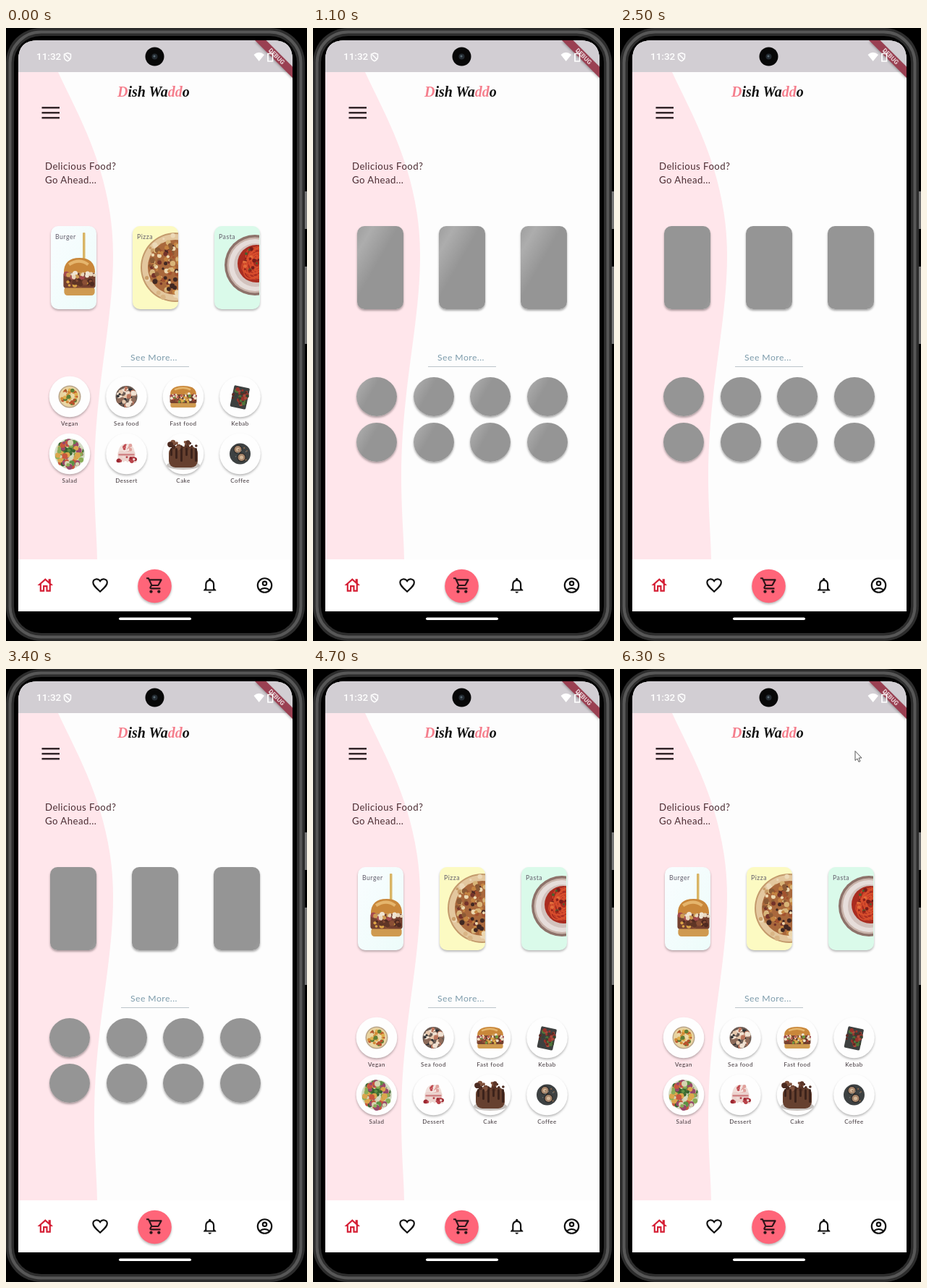
An HTML page for the animation above (6.4 s loop, 416 by 848 pixels).

```html
<!DOCTYPE html>
<html lang="en">
<head>
<meta charset="utf-8">
<title>Food ordering app</title>
<style>
  html, body { margin: 0; width: 100%; height: 100%; overflow: hidden; background: #000; }
  #stage { position: relative; width: 416px; height: 848px; overflow: hidden; }
  svg { position: absolute; inset: 0; }
  text { font-family: Lato, sans-serif; fill: #3c3237; }
  .heading { font-size: 13.2px; letter-spacing: .45px; fill: #4a2c32; }
  .more { font-size: 12.2px; letter-spacing: .45px; fill: #7c9bab; }
  .cardLabel { font-size: 8.7px; letter-spacing: .5px; fill: #625d6b; }
  .itemLabel { font-size: 8px; letter-spacing: .5px; text-anchor: middle; }
  .brand { font: italic bold 20px "Liberation Serif", serif; fill: #111; }
  .brand tspan { fill: #f57f8d; }
  .status { font: 500 13.5px Roboto, sans-serif; fill: #fff; }
  .debug { font: bold 8.6px Roboto, sans-serif; fill: #ecd9dd; text-anchor: middle; }
  .icon { fill: #111; fill-rule: evenodd; }
  .line { fill: none; stroke: #111; stroke-width: 2; }
  .shade { filter: drop-shadow(0 2px 1.6px #0004); }

  .loaded, .photos, .cursor { animation: 6400ms step-end infinite; }
  .loaded { animation-name: loaded; }
  .photos { animation-name: photos; }
  .cursor { animation-name: cursor; }
  .bone {
    position: absolute;
    box-shadow: 0 2px 3px #0005;
    background: linear-gradient(120deg, #959595 36%, #adadad 50%, #959595 64%) 0 0 / 300% 100%;
    animation: bones 6400ms step-end infinite, shimmer 6400ms linear infinite;
  }
  @keyframes loaded { 0%, 62.5% { visibility: visible } 15.625% { visibility: hidden } }
  @keyframes photos { 0%, 64.0625% { visibility: visible } 15.625% { visibility: hidden } }
  @keyframes bones { 0%, 62.5% { visibility: hidden } 15.625% { visibility: visible } }
  @keyframes cursor { 0% { visibility: hidden } 95.3125% { visibility: visible } }
  @keyframes shimmer {
    0%, 15.625% { background-position: 100% 0 }
    27.34%, 40.62% { background-position: -20% 0 }
    40.625% { background-position: 100% 0 }
    52.34%, 100% { background-position: -20% 0 }
  }
</style>
</head>
<body>
<div id="stage">
<svg width="416" height="848" viewBox="0 0 416 848">
  <defs>
    <linearGradient id="mint" x2="1" y2="1">
      <stop stop-color="#f9fdff"/><stop offset="1" stop-color="#edfcfa"/>
    </linearGradient>
    <clipPath id="screen"><path d="M17 807V44Q17 17 44 17H369Q396 17 396 44V807Z"/></clipPath>
    <clipPath id="cardArea"><path d="M62 274h64v115h-64zM175 274h63v115h-63zM288 274h62v115h-62z"/></clipPath>
  </defs>

  <path d="M411 226h5v52h-5zM411 330h5v107h-5z" fill="#777"/>
  <rect x="0" y="0" width="413" height="848" rx="48" fill="#2d2d2d"/>
  <rect x="5.500" y="5.500" width="402" height="837" rx="43" fill="none" stroke="#575757" stroke-width="4"/>
  <rect x="11" y="11" width="391" height="826" rx="37" fill="#000"/>

  <g clip-path="url(#screen)">
    <path d="M17 17H396V807H17Z" fill="#fdfdfd"/>
    <path d="M17 61H72C100 122 148 200 148 315C148 410 122 500 122 620C122 670 126 710 126 735H17Z" fill="#ffe6eb"/>
    <path d="M17 17H396V61H17Z" fill="#d2ced3"/>
    <path d="M344 17H359.500L396 53.500V69Z" fill="#9a4052" class="shade"/>
    <text class="debug" transform="translate(374 39) rotate(45)" y="3">DEBUG</text>
    <path d="M17 735H396V807H17Z" fill="#fff"/>
  </g>

  <text class="status" x="42" y="44">11:32</text>
  <path d="M85 34.500l4.500 1.800v4q0 3.600-4.500 5.500q-4.500-1.900-4.500-5.500v-4zM82 37l6 6" fill="none" stroke="#fff" stroke-width="1.500"/>
  <path d="M342.500 37Q349.500 30.500 357 37L349.700 46Z" fill="#fff"/>
  <path d="M362 35.500h6.500v10.500h-6.500zM364 33.500h2.500" fill="none" stroke="#fff" stroke-width="1.700"/>
  <circle cx="205.500" cy="39.500" r="13" fill="#080808"/>
  <circle cx="205.500" cy="39.500" r="4" fill="#242b32"/><circle cx="205" cy="39" r="1.500" fill="#596a73"/>

  <text class="brand" x="154" y="95"><tspan>D</tspan>ish Wa<tspan>dd</tspan>o</text>
  <path d="M49.500 110.200h24.500M49.500 117.200h24.500M49.500 124.200h24.500" stroke="#33262a" stroke-width="2.400"/>
  <text class="heading" x="54" y="196">Delicious Food?</text>
  <text class="heading" x="54" y="215">Go Ahead...</text>
  <text class="more" x="172" y="460">See More...</text>
  <path d="M159 468.500h94" stroke="#bcc4ca"/>

  <g id="loaded" class="loaded"></g>
  <g id="photos" class="photos"></g>

  <circle cx="205.500" cy="772" r="23.300" fill="#ff6579" class="shade"/>
  <g class="icon" id="nav"></g>
  <rect x="156" y="815.500" width="100" height="3.600" rx="1.800" fill="#fff"/>
  <path class="cursor" d="M325 113.500v13l3-2.500 2 4.500 2-1-2-4.500h4z" fill="#fff" stroke="#555"/>
</svg>
</div>
<script>
  const stage = document.getElementById('stage');
  const columns = [88, 166.5, 245, 323.5];
  const cards = [
    [62, 'Burger', 'url(#mint)'],
    [175, 'Pizza', '#fcfac2'],
    [288, 'Pasta', '#dafaea'],
  ];
  const rows = [
    ['Vegan', 'Sea food', 'Fast food', 'Kebab'],
    ['Salad', 'Dessert', 'Cake', 'Coffee'],
  ];
  // Icons on a 24-unit grid.
  const navIcons = [
    '<path fill="#d51f35" d="M19 9.3V4h-3v2.600L12 3 2 12h3v8h6v-6h2v6h6v-8h3zM17 18h-2v-6H9v6H7v-7.800l5-4.500 5 4.500z"/>',
    '<path class="line" d="M12 20C6 14.500 3 12 3 8.500C3 3.500 9.500 2.500 12 6.500C14.500 2.500 21 3.500 21 8.500C21 12 18 14.500 12 20Z"/>',
    `<g fill="#2c1519"><path d="M15.500 13c.8 0 1.400-.4 1.800-1l3.600-6.500c.3-.7-.2-1.500-.9-1.500H5.200l-.9-2H1v2h2l3.600 7.600-1.400 2.400C4.500 15.400 5.500 17 7 17h12v-2H7l1.100-2zM6.200 6h12.100l-2.800 5h-7z"/>
      <circle cx="7" cy="20" r="2"/><circle cx="17" cy="20" r="2"/></g>`,
    '<path d="M10 20h4a2 2 0 0 1-4 0zM18 16v-5c0-3-1.600-5.600-4.500-6.300V4a1.500 1.500 0 0 0-3 0v.7C7.600 5.400 6 8 6 11v5l-2 2v1h16v-1zM16 17H8v-6c0-2.500 1.500-4.500 4-4.500s4 2 4 4.500z"/>',
    '<g class="line"><circle cx="12" cy="12" r="9"/><circle cx="12" cy="9.500" r="2.500"/><path d="M5.800 18q6.200-5 12.400 0"/></g>',
  ];

  let seed = 7;
  const random = () => (seed = seed * 16807 % 2147483647) / 2147483647;
  const disc = (x, y, r, fill) => `<circle cx="${x}" cy="${y}" r="${r}" fill="${fill}"/>`;
  const bar = (x, y, w, h, fill, rx = 0) =>
    `<rect x="${x}" y="${y}" width="${w}" height="${h}" rx="${rx}" fill="${fill}"/>`;
  const label = (cls, x, y, text) => `<text class="${cls}" x="${x}" y="${y}">${text}</text>`;

  // Small random pieces spread inside an ellipse.
  function scatter(x, y, radius, count, size, colors, flat = 1) {
    let out = '';
    for (let i = 0; i < count; i++) {
      const angle = random() * Math.PI * 2, reach = Math.sqrt(random()) * radius;
      out += disc(x + reach * Math.cos(angle), y + reach * flat * Math.sin(angle),
        size * (.5 + random() * .7), colors[i % colors.length]);
    }
    return out;
  }

  // Strands curling around a centre.
  function noodles(x, y, radius, count, color) {
    let out = '';
    for (let i = 0; i < count; i++) {
      const r = radius * (.3 + .7 * random());
      out += `<ellipse cx="${x}" cy="${y}" rx="${r}" ry="${r * .6}" fill="none" stroke="${color}"
        transform="rotate(${random() * 180} ${x} ${y})"/>`;
    }
    return out;
  }

  function burger(x, y, w, h) {
    const left = x - w / 2, top = y - h / 2;
    return `<path d="M${left + w * .05} ${top + h * .4}q0 ${-h * .4} ${w * .45} ${-h * .4}t${w * .45} ${h * .4}z" fill="#c9873a"/>`
      + `<path d="M${left + w * .2} ${top + h * .18}q${w * .3} ${-h * .18} ${w * .55} 0" stroke="#e5b56c" stroke-width="${h * .08}" fill="none"/>`
      + bar(left + w * .06, top + h * .76, w * .88, h * .24, '#cf9a50', h * .09)
      + bar(left + w * .04, top + h * .4, w * .92, h * .4, '#74402f', h * .06)
      + scatter(x, y - h * .04, w * .45, 24, h * .06, ['#e9d7bd', '#a54a4c', '#f0e4d2', '#cf9c54'], .18)
      + scatter(x, y + h * .17, w * .44, 22, h * .06, ['#4f2a20', '#8a4f35', '#dca447', '#5f3526'], .22);
  }

  const food = {
    Burger: () => bar(106, 283, 3.500, 40, '#d9b566', 1) + burger(101.500, 344, 48, 52),
    Pizza: () => disc(234, 331, 48, '#c39a6c') + disc(234, 331, 46, '#e3c79e')
      + scatter(234, 331, 45, 60, 3, ['#d9b585', '#ecd9b8', '#c99d68'])
      + disc(234, 331, 38, '#a9683c')
      + scatter(234, 331, 36, 170, 3.200, ['#d8b478', '#74332a', '#c48442', '#402722', '#a3522f', '#ecd8b0', '#8b5a35']),
    Pasta: () => disc(344, 328, 42, '#8d726a') + disc(344, 328, 38.500, '#c9b4ab')
      + disc(344, 328, 36, '#e6ddda') + disc(345, 328, 30, '#d2c2bd') + disc(346, 326, 26, '#a92c20')
      + noodles(346, 325, 25, 22, '#d94f2d') + scatter(346, 324, 20, 30, 2.500, ['#781d1a', '#e36d3b', '#8f2018', '#45612e']),
    Vegan: (x, y) => disc(x, y, 15.500, '#b9a58a') + disc(x, y, 14, '#e8d3a0')
      + scatter(x, y, 11, 45, 2.500, ['#d28a35', '#dfb04e', '#5f7d36', '#b9532d', '#ead9a8']),
    'Sea food': (x, y) => disc(x, y, 15, '#6b5b53')
      + scatter(x, y, 13, 50, 3, ['#e7c8ad', '#2f3133', '#ba745c', '#f0e1d2', '#8d6b5a']),
    'Fast food': (x, y) => burger(x, y, 40, 30)
      + scatter(x, y + 3, 17, 20, 2, ['#72943e', '#c0483a', '#e0ab4b', '#efdfc6'], .3),
    Kebab: (x, y) => `<g transform="rotate(12 ${x} ${y})">${bar(x - 11, y - 14, 22, 30, '#3d403f', 2)}</g>`
      + scatter(x, y, 11, 40, 2.500, ['#99352c', '#51763b', '#5d2923', '#a94a3b', '#39422f']),
    Salad: (x, y) => disc(x, y, 21, '#d3dcc4')
      + scatter(x, y, 18, 110, 3.500, ['#5d9144', '#38632f', '#98486a', '#dba64d', '#89ad58', '#c9573e', '#d7d4b2']),
    Dessert: (x, y) => disc(x, y - 3, 11, '#f0dfda') + bar(x - 12, y - 4, 24, 14, '#ecd3ce', 4)
      + scatter(x, y - 9, 8, 14, 2.200, ['#bf4a50', '#f6e9e4', '#e0a19c'], .6)
      + bar(x - 11, y, 22, 2.500, '#d08587') + scatter(x, y + 8, 15, 18, 2.600, ['#9c2831', '#b8434a', '#f0dcd7'], .25),
    Cake: (x, y) => `<ellipse cx="${x}" cy="${y + 16}" rx="23" ry="6" fill="#c7c2bf"/>`
      + bar(x - 20, y - 10, 40, 29, '#66402f', 9)
      + scatter(x, y - 12, 19, 28, 3.200, ['#4a2a20', '#80523d', '#5b3528'], .3)
      + [-18, -11, -4, 3, 10, 16].map((dx, i) => bar(x + dx, y - 8, 3, 11 + i % 3 * 4, '#3d231b', 1.5)).join(''),
    Coffee: (x, y) => disc(x, y, 14.500, '#3d4142')
      + [[-3, -6], [2, 5]].map(([dx, dy]) => disc(x + dx, y + dy, 6, '#222')
        + disc(x + dx, y + dy, 5, '#a5846a') + disc(x + dx, y + dy, 2.500, '#d3b899')).join('')
      + scatter(x, y, 13, 8, 1, ['#87664c', '#6f7471']),
  };

  function addBone(x, y, w, h, radius) {
    const bone = document.createElement('div');
    bone.className = 'bone';
    bone.style.cssText = `left:${x}px;top:${y}px;width:${w}px;height:${h}px;border-radius:${radius}`;
    stage.append(bone);
  }

  let surfaces = '', cardPhotos = '', itemPhotos = '';
  for (const [x, name, fill] of cards) {
    surfaces += `<g class="shade">${bar(x, 274, 63, 115, fill, 10)}</g>`;
    cardPhotos += food[name]();
    addBone(x - 1, 274, 64, 115, '10px');
  }
  rows.forEach((names, row) => names.forEach((name, column) => {
    const x = columns[column], y = 510 + row * 79;
    surfaces += `<g class="shade">${disc(x, y, 28.3, '#fefefe')}</g>` + label('itemLabel', x, y + 39.5, name);
    itemPhotos += food[name](x, y);
    addBone(x - 28, 483 + row * 63, 56, 54, '50%');
  }));
  const cardLabels = cards.map(([x, name]) => label('cardLabel', x + 6, 291.5, name)).join('');

  document.getElementById('loaded').innerHTML = surfaces + cardLabels;
  document.getElementById('photos').innerHTML =
    `<g clip-path="url(#cardArea)">${cardPhotos}</g>` + itemPhotos;
  document.getElementById('nav').innerHTML = navIcons.map((icon, i) =>
    `<g transform="translate(${54.3 + i * 75.8} 771) scale(1.08) translate(-12 -12)">${icon}</g>`).join('');
</script>
</body>
</html>
```
